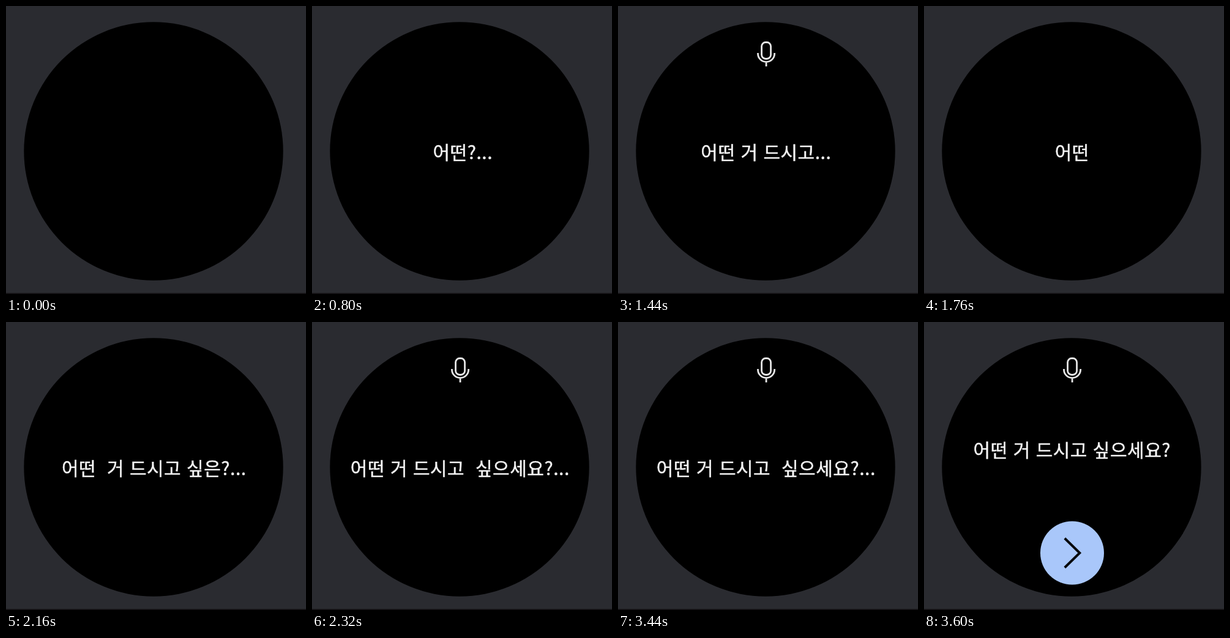
An HTML page that plays this animation: 490x472 px, repeating every 5040 ms.

```html
<!DOCTYPE html>
<html lang="ko">
<head>
<meta charset="utf-8">
<title>음성 입력</title>
<style>
  html, body { margin: 0; width: 100%; height: 100%; overflow: hidden; background: #2a2b30; }
  svg { display: block; width: 490px; height: 472px; }
  text {
    font: 400 30px "Noto Sans CJK KR", "Noto Sans CJK", "Noto Sans CJK JP", sans-serif;
    letter-spacing: 0.5px;
    fill: #f4f4f4;
    stroke: #f4f4f4;
    stroke-width: 0.5px;
    text-anchor: middle;
    white-space: pre;
  }
</style>
</head>
<body>
<svg viewBox="0 0 490 472">
  <rect width="490" height="472" fill="#2a2b30"/>
  <rect y="470.5" width="490" height="1.5" fill="#110e10"/>
  <circle cx="241" cy="238" r="211.7"/>
  <g id="mic" fill="none" stroke="#e6e6e6" stroke-width="2.8">
    <rect x="234.6" y="59.5" width="15" height="27" rx="6.5"/>
    <path d="M228.5 77v1a13.6 13.6 0 0 0 27.2 0v-1M242.1 91.5V99"/>
  </g>
  <text id="speech" x="241.8" y="251"></text>
  <g id="send">
    <circle cx="242" cy="378.5" r="52" fill="#a9c7fa"/>
    <path d="M229.8 354.5L254.3 378.5L229.8 402.5" fill="none" stroke="#080a0d" stroke-width="4"/>
  </g>
</svg>
<script>
  const LOOP = 5040;
  const [mic, speech, send] = ["mic", "speech", "send"].map(id => document.getElementById(id));

  // Listening icon: [on, off] spans
  const micOn = [[240, 800], [1280, 1760], [2320, 2800], [3440, LOOP]];

  // Recognised phrase: [start, text]
  const phrases = [
    [0, ""],
    [800, " 어떤?..."],
    [1040, " 어떤 거?..."],
    [1440, "어떤 거 드시고..."],
    [1600, "어떤"],
    [2160, "어떤  거 드시고 싶은?..."],
    [2240, "어떤 거 드시고  싶으세요?..."],
    [3520, "어떤 거 드시고 싶으세요?"]
  ];
  const DONE = 3520;

  function draw(t) {
    const listening = micOn.some(([on, off]) => t >= on && t < off);
    mic.setAttribute("visibility", listening ? "visible" : "hidden");

    const text = phrases.filter(p => p[0] <= t).pop()[1].replace(/ /g, "\u00a0");
    if (speech.textContent !== text) speech.textContent = text;
    speech.setAttribute("y", t < DONE ? 251 : 221);

    send.setAttribute("opacity", t < DONE ? 0 : t < DONE + 80 ? 0.5 : 1);
  }

  const start = performance.now();
  function tick() {
    draw((performance.now() - start) % LOOP);
    requestAnimationFrame(tick);
  }
  draw(0);
  requestAnimationFrame(tick);
</script>
</body>
</html>
```
